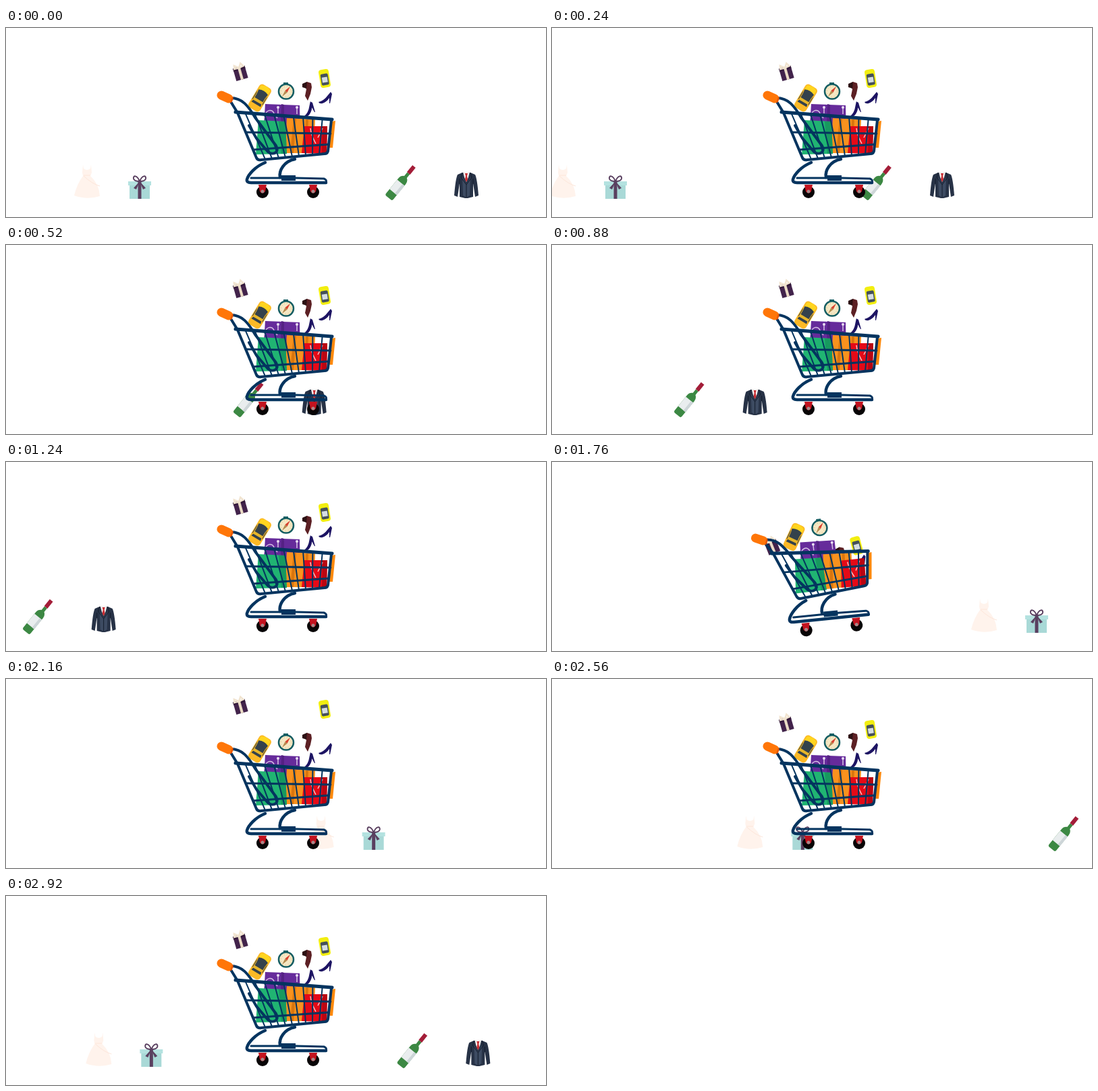
Animation of 800x281 px, one loop 2.96 s. Source, as an HTML page:

```html
<!DOCTYPE html>
<html lang="en">
<head>
<meta charset="utf-8">
<title>Shopping cart</title>
<style>
html, body { margin: 0; width: 100%; height: 100%; overflow: hidden; background: #fff; }
svg { display: block; width: 800px; height: 281px; }
.tube { fill: none; stroke: #04345f; stroke-linecap: round; stroke-linejoin: round; }
</style>
</head>
<body>
<svg viewBox="0 0 800 281">
  <defs>
    <path id="shoe" fill="#1d1463" d="M-10 6Q-2 4 3-3L8-9 10-6 7 8 6 8 6 0Q2 6-4 8Q-9 9-10 6Z"/>
  </defs>

  <!-- goods on the belt, each drawn around x = 0 -->
  <g class="belt" data-x="120">
    <path fill="#fff3ec" d="M-6 203L-5 209Q0 213 5 209L6 203 7 215 5 220Q18 232 19 250Q0 256-19 249Q-15 232-6 220L-7 215Z"/>
    <path fill="none" stroke="#fde6da" d="M-5 220Q8 232 19 235M-5 219H5"/>
  </g>
  <g class="belt" data-x="198">
    <path fill="#a9d9d7" d="M-15 233H15V254H-15Z"/>
    <path fill="#b4e2e0" d="M-17 228H17V234H-17Z"/>
    <path fill="#5a4060" d="M-2.500 228H2.500V254H-2.500Z"/>
    <path fill="none" stroke="#5a4060" stroke-width="2" d="M0 228C-4 218-10 219-9 224C-8 228-3 228 0 228C4 218 10 219 9 224C8 228 3 228 0 228"/>
    <path fill="#5a4060" d="M0 228L-9 238-5 240ZM0 228L9 238 5 240Z"/>
  </g>
  <g class="belt" data-x="585">
    <g transform="translate(0 230) rotate(39)">
      <path fill="#3c8843" d="M-2.500-18H2.500V-11Q7-8 7-3V26Q7 29 4 29H-4Q-7 29-7 26V-3Q-7-8-2.500-11Z"/>
      <path fill="#e9edee" d="M-7 0H7V18H-7Z"/>
      <path fill="#cdd5d8" d="M3 0H7V18H3Z"/>
      <path fill="#a31d38" d="M-3-31H3V-18H-3Z"/>
    </g>
  </g>
  <g class="belt" data-x="682">
    <path fill="#273246" d="M-6 215L-13 218Q-16 224-18 249L-13 251-10 231-10 251-2 253 2 253 10 251 10 231 13 251 18 249Q16 224 13 218L6 215Z"/>
    <path fill="#3d4b62" d="M-6 222L0 232 6 222 5 249 0 252-5 249Z"/>
    <path fill="#f5f1f0" d="M-5 214H5L3 222 0 229-3 222Z"/>
    <path fill="#c82c32" d="M-2 216H2L1 220 2 225 0 229-2 225-1 220Z"/>
    <path fill="none" stroke="#141d2d" d="M-6 215L-8 222 0 233 8 222 6 215M0 233V252M-10 224V232M10 224V232"/>
  </g>

  <g id="cart">
    <g class="gift"><g transform="translate(347 66) rotate(-16)">
      <path fill="#42234b" d="M-9-8H9V11H-9Z"/>
      <path fill="#301738" d="M-9-8H9V-4H-9Z"/>
      <path fill="#eadbc5" d="M-2-8H2V11H-2Z"/>
      <path fill="none" stroke="#f1e4d0" stroke-width="2.500" d="M0-7L-6-12-7-7ZM0-7L4-13 7-8Z"/>
    </g></g>
    <g class="car"><g transform="translate(472 75) rotate(-9)">
      <rect x="-7.500" y="-13.500" width="15" height="27" rx="4" fill="#f2ee10"/>
      <rect x="-5.500" y="-7" width="11" height="17" rx="2" fill="#45505a"/>
      <rect x="-4" y="-2" width="8" height="8" fill="#d5dde2"/>
    </g></g>
    <g class="loose">
      <path fill="#5c2024" d="M440 83L446 80 452 82 453 88 451 98 447 108 443 101 445 91Z"/>
      <path fill="#2c1013" d="M439 83L446 80 445 90 439 88Z"/>
      <use href="#shoe" x="473" y="104"/>
      <use href="#shoe" transform="translate(448 121) rotate(-28)"/>
    </g>
    <g transform="translate(376 104) rotate(31)">
      <rect x="-10" y="-20" width="20" height="40" rx="5" fill="#fcb926"/>
      <path fill="#ffd51f" d="M-8-17Q0-22 8-17V-10H-8Z"/>
      <path fill="#34424c" d="M-8-10Q0-14 8-10L7-4H-7ZM-7 7H7L8 11H-8ZM-9-8L-8-4V6L-9 8ZM9-8L8-4V6L9 8Z"/>
      <rect x="-7" y="-4" width="14" height="11" fill="#e6b62a"/>
      <path fill="#34424c" d="M-7-5H7V3H-7Z"/>
    </g>
    <circle cx="415" cy="94.500" r="11" fill="#f5e8c4" stroke="#155e63" stroke-width="2.500"/>
    <path fill="#155e63" d="M411 81H418V84H411Z"/>
    <circle cx="415" cy="94.500" r="7.500" fill="none" stroke="#d7b984" stroke-dasharray="1 3"/>
    <path fill="#d8402e" d="M421 87L416.500 96 413.500 93Z"/>
    <path fill="#b58b50" d="M409 102L413.500 93 416.500 96Z"/>

    <path fill="#662b9b" d="M384 113L435 115 436 160H381Z"/>
    <path fill="#552184" d="M408 113L412 114 412 145H407Z"/>
    <path fill="#f9921e" d="M416 134L458 136 456 186 413 186Z"/>
    <path fill="#d9760e" d="M426 135L430 135 426 186H421ZM444 136H448L446 186H441Z"/>
    <path fill="#20b472" d="M374 137L414 139 416 187 370 188Z"/>
    <path fill="#17995f" d="M404 139L414 139 416 187 408 187Z"/>
    <path fill="#e50a17" d="M442 146H476L475 187 438 186Z"/>
    <path fill="#b90612" d="M469 146H476L475 187H468Z"/>
    <path fill="none" stroke="#d6c2e5" stroke-width="1.500" d="M383 134C384 120 395 120 397 127L402 134M403 117V127M431 117V128"/>
    <path fill="none" stroke="#f3c4c4" stroke-width="1.500" d="M451 149C452 160 455 164 459 172M469 149L462 163"/>
    <circle cx="403" cy="118" r="2" fill="#e9ddf2"/>
    <circle cx="431" cy="118" r="2" fill="#e9ddf2"/>
    <path fill="#ff8a0d" d="M481 139L488 138 484 178 477 178Z"/>

    <path id="bars" class="tube" stroke-width="2"/>
    <path class="tube" stroke-width="2.800" d="M355 155L481 157M366 181L478 173"/>
    <path class="tube" stroke-width="5" d="M340 125L483 136"/>
    <path class="tube" stroke-width="4" d="M332 108L343 126 371 193Q373 197 378 196L472 187Q476 187 477 183L482 137"/>
    <path class="tube" stroke-width="4" d="M333 104C350 104 359 116 369 133L400 175C406 185 395 190 388 184L371 164 360 145"/>
    <path class="tube" stroke-width="4.500" d="M384 200C369 206 359 218 357 225Q356 230 363 230L474 230"/>
    <path class="tube" stroke-width="3" d="M363 223H430L471 224Q476 226 474 230"/>
    <path class="tube" stroke-width="4.500" d="M428 195C412 198 404 212 406 222"/>
    <path fill="#04345f" d="M408 219H429V227H408Z"/>
    <path stroke="#ff7608" stroke-width="13" stroke-linecap="round" d="M319 100L330 105"/>
    <path stroke="#e75309" stroke-width="2" d="M336 103L333 111"/>
    <g id="wheel">
      <circle cx="380" cy="244" r="9" fill="#080506"/>
      <path fill="#c3131f" d="M374 233H386L384 243Q380 248 376 243Z"/>
      <circle cx="380" cy="243" r="2.500" fill="#a9898b"/>
    </g>
    <use href="#wheel" x="75"/>
  </g>
</svg>
<script>
const LOOP = 2960, STEP = 40, SPEED = 0.43333, SPAN = LOOP * SPEED;
const $ = s => document.querySelector(s);
const belt = [...document.querySelectorAll('.belt')];

let d = '';
for (let i = 1; i < 10; i++)
  d += `M${340 + 14.3 * i} ${125 + 1.1 * i}L${374 + 10 * i} ${196 - 0.9 * i}`;
$('#bars').setAttribute('d', d);

// Eased value at time t through [time, value] keys.
function pose(keys, t) {
  let [t0, v0] = keys[0];
  for (const [t1, v1] of keys) {
    if (t < t1) return t <= t0 ? v0 : v0 + (v1 - v0) * (1 - Math.cos(Math.PI * (t - t0) / (t1 - t0))) / 2;
    [t0, v0] = [t1, v1];
  }
  return v0;
}

const tilt = [[1280, 0], [1520, 9], [1940, -15.2], [2130, 0]];
const drops = {
  gift: [[1400, 0], [1780, 49], [1920, 49], [2160, -26], [2400, 0]],
  car: [[1460, 0], [1780, 52], [1920, 52], [2160, -30], [2400, 0]],
  loose: [[1360, 0], [1720, 46], [1920, 46], [2130, 0]]
};

function draw(now) {
  const t = Math.floor(now % LOOP / STEP) * STEP;
  for (const g of belt) {
    const x = (g.dataset.x - SPEED * t + 200 + SPAN) % SPAN - 200;
    g.setAttribute('transform', `translate(${x} 0)`);
  }
  const a = pose(tilt, t);
  const sink = a > 0 ? 1.6 * a : -0.25 * a + 0.03 * a * a;
  $('#cart').setAttribute('transform', `translate(${0.6 * a} ${sink}) rotate(${a} 417.5 244)`);
  for (const name in drops)
    $('.' + name).setAttribute('transform', `rotate(${-a}) translate(0 ${pose(drops[name], t)}) rotate(${a})`);
}

const start = performance.now();
function tick() {
  draw(performance.now() - start);
  requestAnimationFrame(tick);
}
tick();
</script>
</body>
</html>
```
